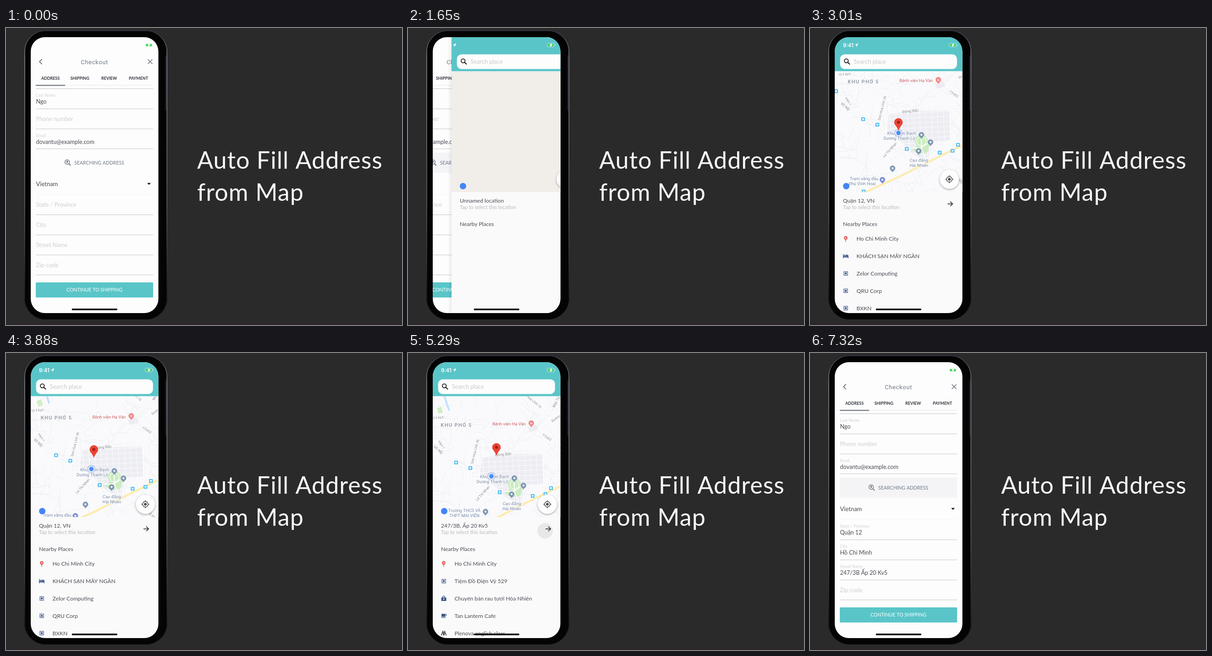
An HTML page with a canvas that plays this animation: 864x648 px, repeating every 7840 ms.

```html
<!DOCTYPE html>
<html lang="en">
<head>
<meta charset="utf-8">
<title>Auto Fill Address from Map</title>
<style>
html, body { margin: 0; width: 100%; height: 100%; overflow: hidden; background: #2a2a2a; }
canvas { display: block; width: 864px; height: 648px; }
</style>
</head>
<body>
<canvas id="stage" width="864" height="648"></canvas>
<script>
const ctx = document.getElementById('stage').getContext('2d');
const LOOP = 7840, STEP = 58.7;
const PUSH = 1530, POP = 5290, FILL = 5980;
const UI = 'Lato, "Open Sans", sans-serif';
const MAP = 'Roboto, "Noto Sans", sans-serif';
const TEAL = '#5ac5c8', SLATE = '#6f7985', INK = '#484b52', FAINT = '#cfcfd2';

const clamp = v => Math.max(0, Math.min(1, v));
const ramp = (t, from, dur) => clamp((t - from) / dur);
const easeOut = u => 1 - (1 - u) ** 3;
const smooth = u => u * u * (3 - 2 * u);
const mix = (a, b, u) => a + (b - a) * u;
const snap = (t, from) => from + Math.floor((t - from + 2) / STEP) * STEP;

function text(s, x, y, size, color, o = {}) {
  ctx.font = `${o.weight || 400} ${size}px ${o.font || UI}`;
  ctx.letterSpacing = (o.gap || 0) + 'px';
  ctx.textAlign = o.align || 'left';
  ctx.fillStyle = color;
  if (o.halo) {
    ctx.strokeStyle = 'rgba(255,255,255,.85)';
    ctx.lineWidth = 2;
    ctx.lineJoin = 'round';
    ctx.strokeText(s, x, y + size * .36);
  }
  ctx.fillText(s, x, y + size * .36);
}

function rect(x, y, w, h, color, r = 0) {
  ctx.fillStyle = color;
  ctx.beginPath();
  ctx.roundRect(x, y, w, h, r);
  ctx.fill();
}

function disc(x, y, r, color) {
  ctx.fillStyle = color;
  ctx.beginPath();
  ctx.arc(x, y, r, 0, Math.PI * 2);
  ctx.fill();
}

function ring(x, y, r, color, width) {
  ctx.strokeStyle = color;
  ctx.lineWidth = width;
  ctx.beginPath();
  ctx.arc(x, y, r, 0, Math.PI * 2);
  ctx.stroke();
}

function trace(points) {
  ctx.beginPath();
  for (let i = 0; i < points.length; i += 2) ctx.lineTo(points[i], points[i + 1]);
}

function line(points, color, width = 1) {
  trace(points);
  ctx.strokeStyle = color;
  ctx.lineWidth = width;
  ctx.stroke();
}

function shape(points, color) {
  trace(points);
  ctx.fillStyle = color;
  ctx.fill();
}

function clipBox(x, y, w, h, r = 0) {
  ctx.beginPath();
  ctx.roundRect(x, y, w, h, r);
  ctx.clip();
}

function group(draw) {
  ctx.save();
  draw();
  ctx.restore();
}

/* ---------- checkout form ---------- */

function field(y, label, value, lift) {
  const size = mix(12.5, 8.6, lift);
  text(label, 65.5, y + mix(0, -7.5, lift), size, FAINT, { gap: .25 * lift });
  if (value) text(value, 65.5, y + 6, 12.5, INK);
  line([65, y + 21.7, 321, y + 21.7], '#c5c5c8');
}

function searchIcon(x, y) {
  ring(x - 1, y - 1, 5, SLATE, 1.5);
  disc(x - 1, y - 2, 1.9, SLATE);
  shape([x - 2.8, y - 1.2, x + .8, y - 1.2, x - 1, y + 2], SLATE);
  line([x + 2.6, y + 2.6, x + 6.5, y + 6.5], SLATE, 2);
}

function form(t, pressed, ripple) {
  rect(54, 20, 278, 602, '#fdfdfd');
  line([78.5, 68, 73, 73.5, 78.5, 79], SLATE, 1.8);
  text('Checkout', 193, 74, 13, SLATE, { font: MAP, gap: .6, align: 'center' });
  line([309.5, 68.5, 319.5, 78.5], SLATE, 1.6);
  line([319.5, 68.5, 309.5, 78.5], SLATE, 1.6);

  ['ADDRESS', 'SHIPPING', 'REVIEW', 'PAYMENT'].forEach((s, i) =>
    text(s, 97 + i * 64, 109.5, 8.9, '#2c313a', { weight: 700, align: 'center' }));
  line([65, 125, 321, 125], '#e4e5e7', 1);
  rect(65, 124, 64, 2.2, SLATE);
  line([65, 132.5, 321, 132.5], '#c2c3c6');

  const lift = t < FILL - 5 ? 0 : ramp(snap(t, FILL), FILL - 20, 220);
  const val = s => t >= FILL - 5 ? s : '';
  field(154.7, 'Last Name', 'Ngo', 1);
  field(198.5, 'Phone number', '', 0);
  field(242, 'Email', 'dovantu@example.com', 1);
  if (pressed) rect(65, 272, 256, 43.5, '#f4f4f7');
  if (ripple) group(() => {
    clipBox(65, 272, 256, 43.5);
    disc(274, 297, 48, '#e6e6e9');
  });
  searchIcon(134.5, 293.5);
  text('SEARCHING ADDRESS', 149, 293.8, 10.5, SLATE);
  text('Vietnam', 65.5, 340, 13, INK);
  shape([308, 338, 316, 338, 312, 342.2], '#1c1c1c');
  line([65, 363.5, 321, 363.5], '#f5f5f6');
  field(385.8, 'State / Province', val('Quận 12'), lift);
  field(429.6, 'City', val('Hồ Chi Minh'), lift);
  field(473.4, 'Street Name', val('247/3B Ấp 20 Kv5'), lift);
  field(517, 'Zip-code', '', 0);
  rect(65, 555, 256, 33, TEAL, 1.5);
  text('CONTINUE TO SHIPPING', 193, 571.7, 10.5, '#fff', { align: 'center' });
}

/* ---------- map ---------- */

function makeLanes() {
  let seed = 71;
  const rnd = () => (seed = seed * 16807 % 2147483647) / 2147483647;
  const path = new Path2D();
  for (let i = 0; i < 210; i++) {
    let x = 40 + rnd() * 320, y = 30 + rnd() * 335;
    let a = .5 * Math.sin(x / 60) - .35 + (rnd() < .5 ? Math.PI / 2 : 0);
    path.moveTo(x, y);
    for (let n = 2 + rnd() * 3; n > 0; n--) {
      const len = 4 + rnd() * 12;
      path.lineTo(x += Math.cos(a) * len, y += Math.sin(a) * len);
      a += (rnd() - .5) * .8;
    }
  }
  return path;
}
const lanes = makeLanes();

const streets = [
  [40, 120, 66, 160, 98, 188, 128, 204, 166, 224, 182, 256, 212, 290, 225, 312],
  [148, 262, 151, 190, 166, 142, 206, 100, 226, 40],
  [100, 335, 150, 298, 190, 246, 172, 192],
  [172, 190, 262, 176, 360, 172],
  [206, 100, 262, 122, 360, 168],
  [262, 122, 300, 98, 350, 62],
  [40, 232, 92, 246, 134, 300, 148, 345],
  [72, 40, 90, 92, 140, 128, 160, 150],
  [306, 180, 308, 272]
];
const zone = [172, 190, 206, 182, 303, 180, 306, 245, 264, 248, 258, 292, 226, 276, 196, 246, 168, 222];
const highway = [90, 372, 200, 322, 250, 296, 345, 250];

function blocks(detail) {
  group(() => {
    trace(zone);
    ctx.clip();
    const alpha = ctx.globalAlpha;
    ctx.globalAlpha = alpha * detail;
    rect(160, 170, 160, 130, '#ededf3');
    ctx.globalAlpha = alpha;
    for (const [color, width] of [['#e5e7ec', 1.9], ['#fdfdfe', 1.2]]) {
      for (let x = 160; x < 320; x += 13) line([x, 170, x + 7, 300], color, width);
      for (let y = 172; y < 300; y += 11) line([160, y + 5, 320, y - 2], color, width);
    }
  });
}

function terrain(detail) {
  ctx.lineJoin = 'round';
  ctx.strokeStyle = '#eceef1';
  ctx.lineWidth = 1;
  ctx.stroke(lanes);
  streets.forEach(s => line(s, '#e9ebef', 3.8));
  streets.forEach(s => line(s, '#ffffff', 2.6));
  blocks(detail);
  shape([272, 122, 290, 116, 296, 126, 278, 133], '#ececf1');
  shape([74, 80, 84, 77, 87, 90, 77, 93], '#d3edc4');
  line([86, 45, 93, 62, 101, 86], '#c4e1fb', 4);

  disc(243, 247, 14, '#cbecc0');
  shape([221, 264, 236, 256, 262, 250, 256, 272, 236, 275], '#cbecc0');
  ring(243, 247, 10, '#f1faee', 1.6);
  line([222, 262, 240, 262, 256, 252], '#ffffff', 2.4);
  line([243, 232, 243, 262, 252, 285], '#ffffff', 2);
  line(highway, '#fbe6ab', 4.6);
  line(highway, '#feedb0', 3.4);
}

const stops = [57, 138, 116, 199, 147, 211, 211, 264, 283, 272, 311, 268, 323, 255, 117, 357];
const roads = [
  ['Sơn Hoà Lĩnh 36', 157, 175, -76, 7.5],
  ['Đông Bắc', 219, 181, -6, 8.5],
  ['Lê Thị Nhạn', 174, 266, -48, 7.8],
  ['Võ Mỹ', 77, 171, 42, 8.5],
  ['Hẻm 1', 84, 160, 55, 7],
  ['TTH02', 314, 144, 32, 7.5],
  ['Tổ 9 Kp5', 75, 101, -5, 7],
  ['Đường 4', 336, 101, -35, 7.5],
  ['Hoà Lĩnh 10', 286, 66, 40, 7.5],
  ['Mai Tú', 334, 67, -62, 8.5],
  ['Võ Mỹ', 325, 330, 42, 8.5]
];

function poi(x, y, color, mark) {
  shape([x - 4.5, y + 2.5, x + 4.5, y + 2.5, x, y + 9], color);
  disc(x, y, 6, color);
  if (mark) text(mark, x, y, 7, '#fff', { font: MAP, weight: 700, align: 'center' });
  else rect(x - 2, y - 2, 4, 4, '#f4f6fa', 1);
}

function caption(s, x, y, color = '#7385a3') {
  text(s, x, y, 9.4, color, { font: MAP, align: 'center', halo: true });
}

function labels(t) {
  for (let i = 0; i < stops.length; i += 2) {
    const x = stops[i], y = stops[i + 1];
    rect(x - 4, y - 4, 8, 8, '#33b3ee', 1);
    rect(x - 2.3, y - 2.2, 4.6, 3.2, '#fff');
    rect(x - 2.3, y + 1.8, 4.6, 1, '#fff');
  }
  roads.forEach(([s, x, y, deg, size]) => group(() => {
    ctx.translate(x, y);
    ctx.rotate(deg * Math.PI / 180);
    text(s, 0, 0, size, '#83878e', { font: MAP, align: 'center', halo: true });
  }));
  text('KHU PHỐ 5', 116.5, 117, 11, '#969dab', { font: MAP, weight: 700, gap: 1.35, align: 'center', halo: true });
  poi(280, 113, '#ef8585', 'H');
  caption('Bệnh viện Hạ Vân', 231.5, 115, '#c4575f');
  [243, 233, 263, 249, 237, 268, 180, 306].forEach((x, i, a) => i % 2 || poi(x, a[i + 1], '#7f98b3'));
  poi(158, 331, '#7b8fd6');
  caption('Khu vườn Bạch', 200, 230);
  caption('Dương Thanh Lộ', 195, 241);
  caption('Cao đẳng', 237.5, 289);
  caption('Hải Nhiên', 237.5, 300);
  caption('Trạm xăng dầu', 118, 329);
  caption('Phú Vĩnh Hoài', 114, 340);
  ctx.globalAlpha *= ramp(t, 4300, 200);
  caption('Trường THCS VÀ', 134, 303.5);
  caption('THPT MAI VIỄN', 134, 314.5);
}

function pin(x, y) {
  ctx.fillStyle = '#ea4335';
  ctx.beginPath();
  ctx.arc(x, y - 18, 9.3, Math.PI * .87, Math.PI * .13);
  ctx.quadraticCurveTo(x + 2, y - 6, x, y);
  ctx.quadraticCurveTo(x - 2, y - 6, x - 8.6, y - 14.4);
  ctx.fill();
  disc(x, y - 18.3, 3.1, '#a11c14');
}

const drag = t => smooth(ramp(t, 3330, 960));

function mapView(t) {
  const base = ramp(t, 1690, 150);
  const detail = ramp(t, 1930, 220);
  const near = ramp(t, 1960, 240);
  const d = drag(t), lag = d - drag(t - 75);
  group(() => {
    clipBox(54, 94.5, 278.5, 263.5);
    rect(54, 94, 279, 264, '#f1ede9');
    ctx.globalAlpha = base;
    rect(54, 94, 279, 264, '#fafafc');
    group(() => {
      ctx.translate(-11 * d, 40 * d);
      terrain(detail);
      const y = mix(226, 229, near), r = mix(48, 9.5, near);
      if (near < 1) ring(193, y, r, 'rgba(90,140,220,.22)', 1);
      disc(193, y, r, `rgba(90,140,220,${mix(.17, .3, near)})`);
      group(() => {
        ctx.globalAlpha *= detail;
        labels(t);
      });
      disc(193, y, 6, '#fff');
      disc(193, y, 4.9, '#4d8df6');
      if (near < 1) shape([183, y + .5, 187, y - 2.5, 187, y + 3.5], '#4d8df6');
    });
    pin(193 - 11 * lag, 224 + 40 * lag);
    ctx.globalAlpha = 1;
    disc(79, 345, 7, '#4285f4');
  });

  group(() => {
    ctx.shadowColor = 'rgba(0,0,0,.35)';
    ctx.shadowBlur = 4;
    ctx.shadowOffsetY = 1.5;
    disc(304, 330, 21, '#fdfdfd');
  });
  ring(304, 330, 6, '#4b4b4b', 1.5);
  disc(304, 330, 3, '#4b4b4b');
  for (const [x, y] of [[1, 0], [-1, 0], [0, 1], [0, -1]])
    line([304 + x * 6, 330 + y * 6, 304 + x * 8.7, 330 + y * 8.7], '#4b4b4b', 1.5);
}

/* ---------- place picker ---------- */

const BLUE = '#40598c';
const icons = {
  pin(y) {
    disc(78, y - 2, 3.9, '#e0635f');
    rect(77.2, y, 1.6, 6.5, '#e0635f');
    disc(78, y - 2, 1.2, '#fff');
  },
  bed(y) {
    rect(72, y - 4.5, 1.5, 9, BLUE);
    rect(72, y + .3, 12, 2.3, BLUE);
    rect(82.5, y, 1.5, 4.5, BLUE);
    disc(75.6, y - 1.6, 1.5, BLUE);
    rect(77.5, y - 3, 6, 3, BLUE, 1);
  },
  box(y) {
    ctx.strokeStyle = BLUE;
    ctx.lineWidth = 1.2;
    ctx.strokeRect(74, y - 4, 8, 8);
    rect(76, y - 2, 4, 4, BLUE);
  },
  bag(y) {
    ring(78, y - 2.5, 2.7, BLUE, 1.3);
    rect(72.5, y - 2, 11, 7.5, BLUE, 1);
    disc(78, y + 1.5, 1.3, '#fff');
  },
  cup(y) {
    rect(73, y - 4.5, 8, 6.5, BLUE, 1);
    ring(81.5, y - 1.8, 2, BLUE, 1.2);
    rect(72.5, y + 3, 10, 1.4, BLUE);
  },
  camp(y) {
    line([72.5, y + 5, 76, y - 4, 79.5, y + 5], '#4a4d55', 1.8);
    line([76.5, y + 5, 80, y - 4, 83.5, y + 5], '#4a4d55', 1.8);
    line([73.5, y + 1, 82.5, y + 1], '#4a4d55', 1.2);
  }
};
const firstList = [
  ['pin', 'Ho Chi Minh City'], ['bed', 'KHÁCH SẠN MÂY NGÀN'], ['box', 'Zelor Computing'],
  ['box', 'QRU Corp'], ['box', 'BXKN']
];
const secondList = [
  ['pin', 'Ho Chi Minh City'], ['box', 'Tiệm Đồ Điện Vỹ 529'], ['bag', 'Chuyên bán rau tươi Hòa Nhiên'],
  ['cup', 'Tan Lantern Cafe'], ['camp', 'Plenova english class']
];

function picker(t) {
  rect(54, 20, 279, 602, '#fafafb');
  rect(54, 20, 279, 74.5, TEAL);
  rect(65.7, 57.5, 255, 32, '#fdfdfd', 10);
  ring(79.2, 71.6, 4.3, '#161616', 1.7);
  line([82.3, 74.7, 87, 79.4], '#161616', 2);
  text('Search place', 95.5, 73.8, 12.8, '#c9c9cb');
  mapView(t);

  const moved = t >= 4630;
  const place = t < 2250 ? 'Unnamed location' : moved ? '247/3B, Ấp 20 Kv5' : 'Quận 12, VN';
  text(place, 72, 377, 12, INK);
  text('Tap to select this location', 72, 391, 11, '#b9b9bc');
  if (t >= 5200) disc(299, 388, 17 * ramp(t, 5150, 120), '#e8e8ea');
  line([300, 383.7, 311, 383.7], '#222', 1.5);
  line([306, 378.6, 311.2, 383.7, 306, 388.8], '#222', 1.5);
  text('Nearby Places', 72, 428, 12, INK);
  if (t < 2500) return;
  (moved ? secondList : firstList).forEach(([icon, name], i) => {
    const y = 460 + i * 37.8;
    icons[icon](y);
    text(name, 101.5, y, 12.1, INK);
  });
}

/* ---------- device ---------- */

function statusBar() {
  text('9:41', 72, 37.5, 11.3, '#fff', { font: 'Inter, Roboto, sans-serif', weight: 600 });
  shape([97.5, 37.2, 105.5, 33, 101.6, 41.4, 101, 37.8], '#fff');
  ctx.strokeStyle = 'rgba(255,255,255,.5)';
  ctx.lineWidth = 1;
  ctx.beginPath();
  ctx.roundRect(303.5, 33.2, 16, 8, 2.2);
  ctx.stroke();
  rect(320.3, 35.6, 1.2, 3.2, 'rgba(255,255,255,.5)');
  rect(305, 34.7, 13.5, 5.2, '#4fd264', 1);
  const bolt = [313, 33.5, 309.6, 37.8, 312, 37.8, 310.8, 41, 314.4, 36.6, 312, 36.6, 313, 33.5];
  line(bolt, '#fff', 1);
  shape(bolt, '#fff');
  rect(143.5, 612.3, 99.5, 3.4, '#000', 1.7);
}

function phone() {
  rect(40, 5, 312, 631, '#040405', 47);
  const edge = ctx.createLinearGradient(0, 5, 0, 636);
  edge.addColorStop(0, '#3a3a50');
  edge.addColorStop(.1, '#85858d');
  edge.addColorStop(.6, '#636368');
  edge.addColorStop(.85, '#2a2a2c');
  edge.addColorStop(1, '#0a0a0b');
  ctx.strokeStyle = edge;
  ctx.lineWidth = 1.6;
  ctx.beginPath();
  ctx.roundRect(40.8, 5.8, 310.4, 629.4, 46);
  ctx.stroke();
  line([348.5, 60, 348.5, 180], '#23233a', 2);
}

function screen(time) {
  let t = time, shown = 0;
  if (time >= PUSH && time < 5600) {
    t = snap(time, PUSH);
    shown = t < POP ? easeOut(ramp(t, 1487, 340)) : 1 - easeOut(ramp(t, POP, 288));
  }
  if (shown < 1) group(() => {
    ctx.translate(-93 * shown, 0);
    form(time, time >= PUSH, time >= PUSH && time < 2000);
    rect(332, 20, 93, 602, '#fdfdfd');
  });
  if (shown > 0) group(() => {
    const x = 278 * (1 - shown);
    if (x > .5) {
      const g = ctx.createLinearGradient(46 + x, 0, 54 + x, 0);
      g.addColorStop(0, 'rgba(0,0,0,0)');
      g.addColorStop(1, 'rgba(0,0,0,.07)');
      rect(46 + x, 20, 8, 602, g);
    }
    ctx.translate(x, 0);
    picker(t);
  });
}

function draw(t) {
  rect(0, 0, 864, 648, '#2a2a2a');
  rect(0, 645, 864, 3, '#2d2529');
  phone();
  group(() => {
    clipBox(54, 20, 278.5, 602, 31);
    screen(t);
    statusBar();
  });
  text('Auto Fill Address', 417, 288, 52, '#f8f8f8', { gap: 1 });
  text('from Map', 417, 358, 52, '#f8f8f8', { gap: 1.1 });
}

const start = performance.now();
function frame() {
  draw((performance.now() - start) % LOOP);
  requestAnimationFrame(frame);
}
frame();
</script>
</body>
</html>
```
